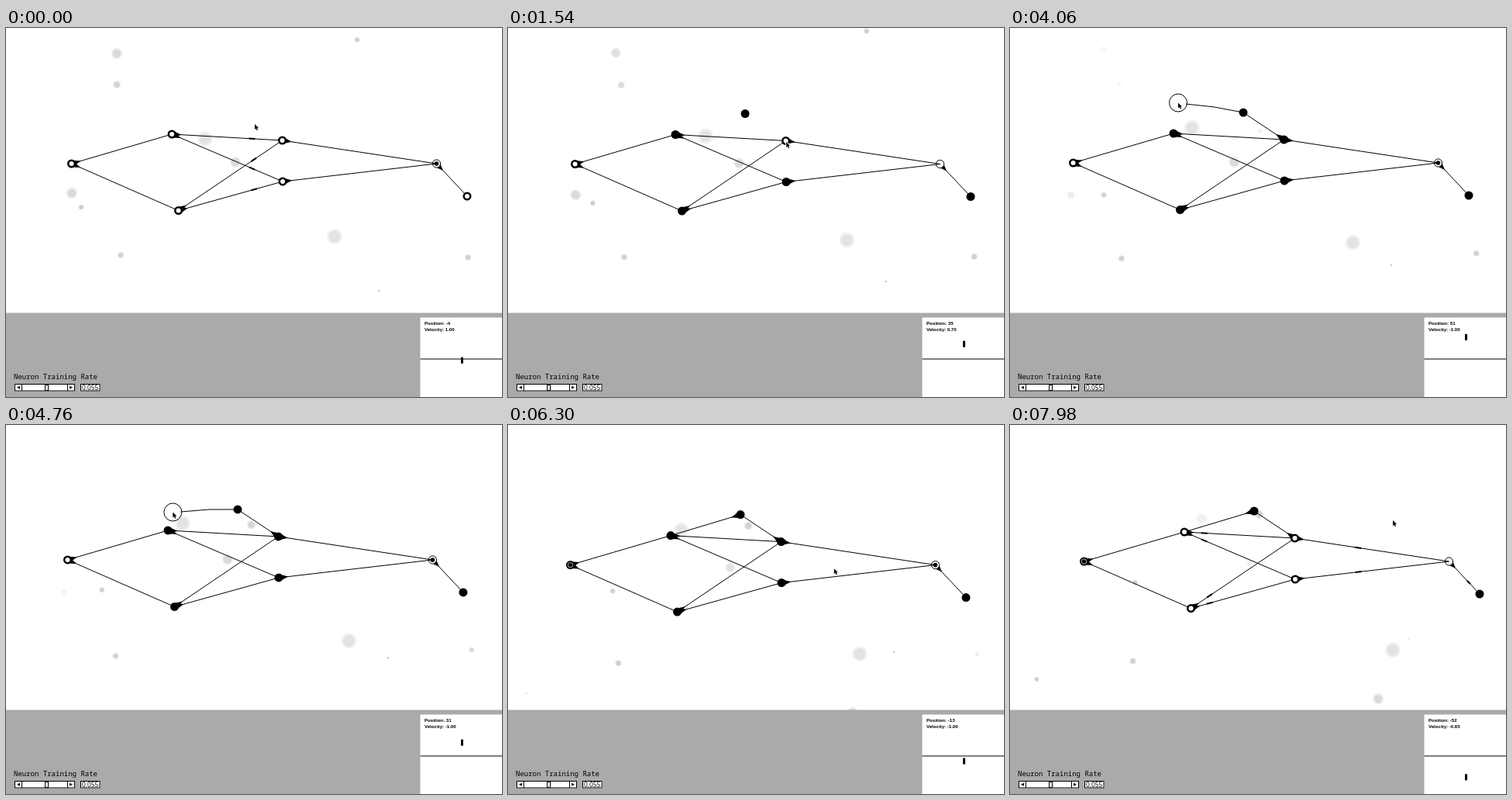
These frames come from a looping animation (640 px wide and 476 px high, 8000 ms). An HTML page with a canvas:

```html
<!DOCTYPE html>
<html lang="en">
<head>
<meta charset="utf-8">
<title>Neuron playground</title>
<style>
  html, body { margin: 0; width: 100%; height: 100%; overflow: hidden; background: #fff; }
  canvas { display: block; }
</style>
</head>
<body>
<canvas id="stage" width="640" height="476"></canvas>
<script>
const ctx = document.getElementById('stage').getContext('2d');
const LOOP = 8000, STEP = 70, TICK = 35;
const TRAVEL = 455, PERIOD = 560, RING_TIME = 450;
const SPAWN = 840, LINK_DH = 3000, LINK_HB = 5600;

const nodes = {
  A: [84.5, 175], B: [214, 137], C: [222.5, 235.5], D: [356.5, 145],
  E: [357, 198], F: [555.5, 175], G: [595, 217], H: [304, 110]
};
const layers = ['A', 'BC', 'DE', 'F', 'G'];
const links = ['AB', 'AC', 'BD', 'BE', 'CD', 'CE', 'DF', 'EF', 'FG'];

// The input neuron fires in bursts of three.
const waves = [-1905, 6323].flatMap(t => [t, t + PERIOD, t + 2 * PERIOD]);
// Ticks between which the output neuron pushes the bar up.
const pushes = [[0, 28], [39, 69], [186, 199], [221, Infinity]];

// time, x, y
const swayKeys = [
  [0, 0, 0], [1540, 2, 0.5], [2940, 0, -0.5], [4060, -3, -1],
  [5460, -6, 0], [6930, -0.7, 8.5], [7980, 11, 1]
];
// x, y, arrival, departure
const cursorStops = [
  [321, 124, 0, 0], [306, 111, 700, 900], [359, 147, 1400, 1600],
  [305, 108, 2700, 3100], [217, 96.5, 4060, 4400], [213, 134, 5200, 5600],
  [546, 216, 6800, 7050], [494, 123, 7980, LOOP]
];
// x, y, vx, vy, radius, birth (seconds)
const motes = [
  [143, 33, -4.5, -1, 7, -8],
  [143, 73, 0.4, 0, 5, -8],
  [85, 213, -0.5, 1, 7, -7],
  [97, 231, 6.7, -3.6, 3.5, -1],
  [257, 143, -4, -3, 10, -3],
  [296, 173, -0.5, 0.4, 7, -3.5],
  [148, 293, -0.2, 1.3, 4, -1],
  [424, 269, 6, 2.4, 10, -1],
  [453, 15, 5, -7.4, 3.5, -2],
  [596, 296, 2.2, -1, 4, -5],
  [481, 339, 3.2, -8, 1.5, -3],
  [347, 154, -5, -5, 5.5, 3.8],
  [40, 391, -2, -8, 3, 6],
  [426, 402, 4, -6.3, 7, 5]
];

const clamp = (v, lo, hi) => Math.max(lo, Math.min(hi, v));
const mix = (a, b, u) => a + (b - a) * u;
const mixPoint = (a, b, u) => [mix(a[0], b[0], u), mix(a[1], b[1], u)];

function cursorAt(t) {
  let i = 0;
  while (i < cursorStops.length - 2 && t > cursorStops[i + 1][3]) i++;
  const a = cursorStops[i], b = cursorStops[i + 1];
  const u = clamp((t - a[3]) / (b[2] - a[3]), 0, 1);
  return mixPoint(a, b, u * u * (3 - 2 * u));
}

function swayAt(t) {
  const keys = swayKeys, last = keys.length - 1;
  let i = 0;
  while (i < last - 1 && t > keys[i + 1][0]) i++;
  const slope = (k, c) => {
    const a = keys[Math.max(0, k - 1)], b = keys[Math.min(last, k + 1)];
    return (b[c] - a[c]) / (b[0] - a[0]);
  };
  const span = keys[i + 1][0] - keys[i][0];
  const u = clamp((t - keys[i][0]) / span, 0, 1), v = 1 - u;
  return [1, 2].map(c =>
    (1 + 2 * u) * v * v * keys[i][c] + u * v * v * span * slope(i, c) +
    u * u * (3 - 2 * u) * keys[i + 1][c] - u * u * v * span * slope(i + 1, c));
}

const pushing = tick => pushes.some(([a, b]) => tick > a && tick <= b);

function barAt(t) {
  let speed = 1, pos = -4.45;
  for (let k = 1; k <= t / TICK; k++) {
    speed = clamp(speed + (pushing(k) ? 0.05 : -0.05), -1, 1);
    pos += speed * 1.02;
  }
  return { speed, pos };
}

function disc(x, y, r, fill) {
  ctx.fillStyle = fill;
  ctx.beginPath();
  ctx.arc(x, y, r, 0, Math.PI * 2);
  ctx.fill();
}

function circle(x, y, r) {
  ctx.strokeStyle = '#000';
  ctx.lineWidth = 1;
  ctx.beginPath();
  ctx.arc(x, y, r, 0, Math.PI * 2);
  ctx.stroke();
}

function line(x1, y1, x2, y2, width = 1) {
  ctx.strokeStyle = '#000';
  ctx.lineWidth = width;
  ctx.beginPath();
  ctx.moveTo(x1, y1);
  ctx.lineTo(x2, y2);
  ctx.stroke();
}

function rect(x, y, w, h, fill) {
  ctx.fillStyle = fill;
  ctx.fillRect(x, y, w, h);
}

function box(x, y, w, h) {
  rect(x, y, w, h, '#fff');
  ctx.strokeStyle = '#000';
  ctx.lineWidth = 1;
  ctx.strokeRect(x + 0.5, y + 0.5, w - 1, h - 1);
}

function polygon(points) {
  ctx.beginPath();
  points.forEach(([x, y]) => ctx.lineTo(x, y));
  ctx.closePath();
  ctx.fillStyle = '#000';
  ctx.fill();
}

function label(text, x, y, font) {
  ctx.fillStyle = '#000';
  ctx.font = font;
  ctx.fillText(text, x, y);
}

// Larger motes are nearer: fainter, and moved more by the sway.
function drawMotes(t, sway) {
  const s = t / 1000;
  for (const [x, y, vx, vy, r, birth] of motes) {
    const age = s - birth;
    const life = clamp(Math.min(age, (13 - age) / 4), 0, 1);
    const depth = 0.5 + 0.15 * r;
    const px = x + vx * s + depth * sway[0], py = y + vy * s + depth * sway[1];
    const size = r * (0.5 + 0.5 * life);
    const tone = `rgba(0,0,0,${(0.22 - 0.012 * r) * life * 0.55})`;
    disc(px, py, size, tone);
    disc(px, py, size * 0.75, tone);
  }
}

function drawLink(from, to) {
  const [x1, y1] = from, [x2, y2] = to;
  line(x1, y1, x2, y2);
  const d = Math.hypot(x2 - x1, y2 - y1), dx = (x2 - x1) / d, dy = (y2 - y1) / d;
  const along = (k, side) => [x1 + dx * k - dy * side, y1 + dy * k + dx * side];
  polygon([along(3, 3.6), along(12.5, 0), along(3, -3.6)]);
}

const fireTime = (wave, name) =>
  wave + TRAVEL * layers.findIndex(group => group.includes(name));

function drawPulses(t, name, from, to) {
  const d = Math.hypot(to[0] - from[0], to[1] - from[1]);
  const half = Math.min(4 / d, 0.05);
  for (const w of waves) {
    const u = (t - fireTime(w, name[0])) / TRAVEL;
    if (u < 0.14 || u > 0.9) continue;
    line(...mixPoint(from, to, u - half), ...mixPoint(from, to, u + half), 2);
  }
}

function glowing(t, name) {
  if (name === 'H') return false;
  if (name === 'D' && t >= 1400 && t < 1750) return true;
  return waves.some(w => {
    const age = t - fireTime(w, name);
    return age >= 0 && age < RING_TIME;
  });
}

function drawNode(t, name, [x, y]) {
  disc(x, y, 5.5, '#000');
  if (name === 'A') {
    const charged = t > 5810;
    disc(x, y, charged ? 3.7 : 3, charged ? '#888' : '#fff');
    if (charged) disc(x, y, 2.5, '#000');
  } else if (glowing(t, name)) {
    disc(x, y, 3, '#fff');
  }
}

function drawOutput(t, [x, y]) {
  disc(x, y, 5.2, '#fff');
  circle(x, y, 5.1);
  if (!pushing(t / TICK)) disc(x, y, 2.8, '#000');
}

function drawDrag(node, cursor, bow) {
  const d = Math.hypot(node[0] - cursor[0], node[1] - cursor[1]);
  circle(...cursor, 11.5);
  if (d < 12) return;
  const from = mixPoint(cursor, node, 10 / d), mid = mixPoint(from, node, 0.5);
  ctx.beginPath();
  ctx.moveTo(...from);
  ctx.quadraticCurveTo(mid[0], mid[1] - bow, ...node);
  ctx.stroke();
}

function drawNetwork(t, sway, cursor) {
  const at = {};
  for (const k in nodes) at[k] = [nodes[k][0] + sway[0], nodes[k][1] + sway[1]];

  drawLink(at.F, at.G);
  drawOutput(t, at.F);
  for (const name of links) {
    const from = at[name[0]], to = at[name[1]];
    if (name !== 'FG') drawLink(from, to);
    drawPulses(t, name, from, to);
  }
  if (t >= LINK_DH) drawLink(at.D, at.H);
  if (t >= LINK_HB) drawLink(at.H, at.B);
  if (t > 1600 && t < LINK_DH) drawDrag(at.D, cursor, 0);
  if (t > 3150 && t < LINK_HB) drawDrag(at.H, cursor, 3);
  for (const k in at) {
    if (k === 'F' || (k === 'H' && t < SPAWN)) continue;
    drawNode(t, k, at[k]);
  }
}

function drawSlider() {
  label('Neuron Training Rate', 10, 453, '9px "Noto Sans Mono", monospace');
  box(11, 459, 78, 9.5);
  for (const side of [-1, 1]) {
    const x = 50 + side * 29.5, tip = 50 + side * 36;
    line(x, 459, x, 468, 1);
    polygon([[tip, 463.7], [tip - side * 4, 461.7], [tip - side * 4, 465.7]]);
  }
  box(50, 460, 5, 8);
  box(96, 459, 25.5, 9.5);
  label('0.055', 98, 466.8, '8.3px "Open Sans", sans-serif');
}

function drawPanel(t) {
  const { speed, pos } = barAt(t);
  const font = 'bold 6.1px "Liberation Sans", Arial, sans-serif';
  rect(0, 367.5, 640, 109, '#aaa');
  drawSlider();
  rect(534.5, 373.5, 106, 103, '#fff');
  label('Position: ' + (Math.trunc(pos) + 0), 540, 383, font);
  label('Velocity: ' + speed.toFixed(2), 540, 391.2, font);
  line(534.5, 427, 640, 427);
  rect(587, 422.3 - pos * 0.533, 3, 8, '#000');
}

function drawCursor([x, y]) {
  ctx.strokeStyle = '#fff';
  ctx.lineWidth = 2;
  polygon([
    [x, y], [x, y + 7], [x + 1.6, y + 5.6], [x + 2.8, y + 8.2],
    [x + 4, y + 7.6], [x + 2.9, y + 5.2], [x + 5, y + 5]
  ]);
  ctx.stroke();
  ctx.fill();
}

function render(now) {
  const t = Math.floor((now % LOOP) / STEP) * STEP;
  const sway = swayAt(t), cursor = cursorAt(t);
  rect(0, 0, 640, 476, '#fff');
  drawMotes(t, sway);
  drawNetwork(t, sway, cursor);
  drawPanel(t);
  drawCursor(cursor);
}

let start;
function frame(now) {
  if (start === undefined) start = now;
  render(now - start);
  requestAnimationFrame(frame);
}
render(0);
requestAnimationFrame(frame);
</script>
</body>
</html>
```
